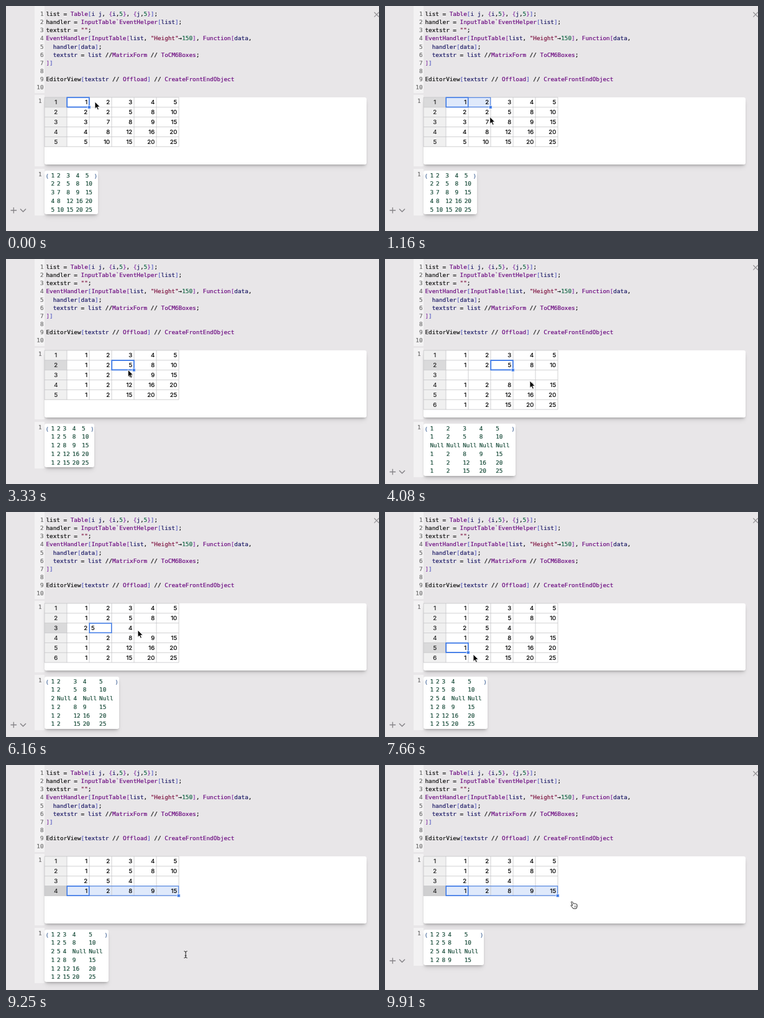
These frames come from a looping animation (600 by 362 pixels, 9990 ms). An HTML page:

```html
<!DOCTYPE html>
<html lang="en">
<head>
<meta charset="utf-8">
<title>Notebook table editing</title>
<style>
html, body { margin: 0; width: 100%; height: 100%; overflow: hidden; background: #e8e6e8; }
#stage { position: absolute; left: 0; top: 0; width: 600px; height: 362px; overflow: hidden; }
#stage div { position: absolute; }
.gutter { left: 46px; width: 16px; background: #f3f2f3; }
.card { left: 62px; background: #fff; border-radius: 3px; box-shadow: 0 6px 9px -2px rgba(0,0,0,.1), 0 3px 4px -2px rgba(0,0,0,.28); }
svg { position: absolute; left: 0; top: 0; }
text { white-space: pre; }
text, tspan { fill: currentColor; stroke: currentColor; stroke-width: .2px; }
.code { font: 9.32px "DejaVu Sans Mono", monospace; }
.cell { font: 9.6px Inter, sans-serif; }
</style>
</head>
<body>
<div id="stage">
  <div class="gutter" style="top:0;height:140px"></div>
  <div class="gutter" style="top:143px;height:115px"></div>
  <div class="gutter" id="outGutter" style="top:262px"></div>
  <div class="card" style="top:147px;width:518px;height:108px"></div>
  <div class="card" id="outCard" style="top:265px"></div>
  <svg width="600" height="362">
    <g id="code"></g>
    <g id="live"></g>
  </svg>
</div>
<script>
const LOOP = 9990, STEPS = 120;
const CHAR = 5.61;
const BLUE = '#3f7be8';
const $ = id => document.getElementById(id);

const esc = s => String(s).replace(/&/g, '&amp;').replace(/</g, '&lt;');
const text = (x, y, s, cls, color, anchor = 'start') =>
  `<text x="${x}" y="${y}" class="${cls}" color="${color}" text-anchor="${anchor}">${esc(s)}</text>`;
const rect = (x, y, w, h, fill, stroke = 'none', sw = 1) =>
  `<rect x="${x}" y="${y}" width="${w}" height="${h}" fill="${fill}" stroke="${stroke}" stroke-width="${sw}"/>`;
const path = (d, stroke, sw, fill = 'none') =>
  `<path d="${d}" stroke="${stroke}" stroke-width="${sw}" fill="${fill}" stroke-linejoin="round"/>`;

// ---- code cell
const LINES = [
  'list = Table[i j, {i,5}, {j,5}];',
  'handler = InputTable`EventHelper[list];',
  'textstr = "";',
  'EventHandler[InputTable[list, "Height"→150], Function[data,',
  '  handler[data];',
  '  textstr = list //MatrixForm // ToCM6Boxes;',
  ']]',
  '',
  'EditorView[textstr // Offload] // CreateFrontEndObject',
  ''
];
const BRACKETS = ['#5c62c4', '#8b3aa8', '#5c62c4'];

function drawCode() {
  let depth = 0;
  const color = tok => {
    if (/^"/.test(tok)) return '#7d1340';
    if (/^(?!EditorView)[A-Z]/.test(tok)) return '#6b0a80';
    if (/^\d/.test(tok)) return '#164';
    if (/[\[{]/.test(tok)) return BRACKETS[depth++ % 3];
    if (/[\]}]/.test(tok)) return BRACKETS[--depth % 3];
    return depth && /^[a-z]/.test(tok) ? '#1c1a66' : '#111';
  };
  const rows = LINES.map((line, i) => {
    const y = 16.1 + i * 13.13;
    const spans = (line.match(/"[^"]*"|[A-Z][\w`]*|[a-z]\w*|\d+|[\[\]{}]|[^\w"\[\]{}]+/g) || [])
      .map(tok => `<tspan color="${color(tok)}">${esc(tok)}</tspan>`).join('');
    return text(60.5, y, i + 1, 'code', '#6c6c6c', 'end') +
      `<text x="64.5" y="${y}" class="code">${spans}</text>`;
  });
  $('code').innerHTML = rows.join('') +
    text(52, 156.2, 1, 'code', '#6c6c6c') + text(52, 274.4, 1, 'code', '#6c6c6c');
}

// ---- what happens when
const copy = grid => grid.map(row => row.slice());
const sync = s => { s.out = copy(s.grid); };
const select = (r, c, r2 = r, c2 = c) => s => { s.sel = [r, c, r2, c2]; s.edit = null; };
const type = value => s => { s.edit = value; };
const commit = (r, c) => s => {
  s.grid[s.sel[0]][s.sel[1]] = s.edit;
  select(r, c)(s);
};
const hover = on => s => { s.hover = on; };
const syncRow = r => s => { s.out[r] = s.grid[r].slice(); };

const EVENTS = [
  [650, select(0, 0, 0, 1)],
  [1700, s => {
    s.grid.forEach(row => row.splice(0, 2, 1, 2));
    select(0, 0, 4, 1)(s);
  }],
  [1900, syncRow(1)], [2080, syncRow(2)],
  [2250, select(1, 3)],
  [2300, syncRow(3)], [2570, syncRow(4)],
  [2700, select(1, 2)],
  [3200, hover(false)],
  [3900, s => { s.grid.splice(2, 0, Array(5).fill('')); s.hover = true; }],
  [4070, sync],
  [4450, select(2, 0)], [4750, type(2)], [4980, commit(2, 1)], [5150, sync],
  [5350, select(2, 2)], [5550, type(4)], [5750, commit(2, 1)], [5900, sync],
  [6070, type(5)], [6500, commit(3, 1)], [6700, sync],
  [7300, select(4, 0)],
  [8000, select(4, 0, 5, 4)],
  [8150, hover(false)],
  [8900, s => { s.grid.splice(4, 2); select(3, 0, 3, 4)(s); }],
  [9550, hover(true)],
  [9700, sync]
];

function stateAt(t) {
  const grid = [
    [1, 2, 3, 4, 5], [2, 2, 5, 8, 10], [3, 7, 8, 9, 15], [4, 8, 12, 16, 20], [5, 10, 15, 20, 25]
  ];
  const s = { grid, out: copy(grid), sel: [0, 0, 0, 0], edit: null, hover: true };
  for (const [at, act] of EVENTS) if (at <= t) act(s);
  return s;
}

// ---- spreadsheet
const colX = c => 98 + c * 36;
const rowY = r => 147 + r * 15.85;

function drawTable({ grid, sel, edit }) {
  const [r1, c1, r2, c2] = sel;
  const bottom = rowY(grid.length);
  const base = r => rowY(r) + 11.3;
  let h = '';
  grid.forEach((row, r) => {
    const active = r >= r1 && r <= r2;
    h += rect(62, rowY(r), 36, 15.85, active ? (c2 - c1 === 4 ? '#cfcfd0' : '#dadadb') : '#f0f0f0');
  });
  if (r1 !== r2 || c1 !== c2) {
    h += rect(colX(c1), rowY(r1), colX(c2 + 1) - colX(c1), rowY(r2 + 1) - rowY(r1), '#dfe9fb');
  }
  let grille = '';
  for (let r = 0; r <= grid.length; r++) grille += `M62 ${rowY(r)}H278`;
  for (let c = -1; c <= 5; c++) grille += `M${colX(c)} 147V${bottom}`;
  h += path(grille, '#c6c6c8', 0.8);
  grid.forEach((row, r) => {
    h += text(80.3, base(r), r + 1, 'cell', '#222', 'middle');
    row.forEach((v, c) => { h += text(colX(c) + 33.2, base(r), v, 'cell', '#000', 'end'); });
  });
  const x = colX(c1) + 0.3, y = rowY(r1) + 0.3;
  if (edit !== null) {
    return h + rect(x, y, 35.4, 15.3, '#fff', BLUE, 1.5) + text(x + 2.6, base(r1), edit, 'cell', '#000');
  }
  const right = colX(c2 + 1), low = rowY(r2 + 1);
  h += rect(x, y, right - x - 0.3, low - y - 0.3, 'none', BLUE, r1 === r2 && c1 === c2 ? 1.5 : 1);
  h += rect(x, y, 35.4, 15.3, 'none', BLUE, 1.5);
  return h + rect(right - 2.8, low - 2.6, 5, 5, BLUE, '#fff', 0.8);
}

// ---- matrix output
function drawMatrix({ out, hover }) {
  const label = v => v === '' ? 'Null' : String(v);
  const bottom = 265.5 + out.length * 13.75;
  let x = 72.4, h = '';
  for (let c = 0; c < 5; c++) {
    const col = out.map(row => label(row[c]));
    col.forEach((v, r) => { h += text(x, 275.6 + r * 13.75, v, 'code', '#164a38'); });
    x += Math.max(...col.map(v => v.length)) * CHAR + 4;
  }
  const end = x - 4;
  h += text(63.5, 276.8, '(', 'code', '#47689a') + text(end + 2.6, 276.8, ')', 'code', '#47689a');
  const card = $('outCard').style;
  card.width = end + 9 - 62 + 'px';
  card.height = bottom - 264 + 'px';
  $('outGutter').style.height = bottom + 2.5 - 262 + 'px';
  if (hover) {
    const y = bottom - 5.5;
    h += path(`M7.5 ${y}h9.6M12.3 ${y - 4.8}v9.6`, '#858387', 1.3);
    h += path(`M23 ${y - 2.3}l4.5 4.6l4.5 -4.6`, '#858387', 1.4);
    h += path('M592.3 10l7.6 7.6M599.9 10l-7.6 7.6', '#949296', 1.2);
  }
  return h;
}

// ---- pointer: time, x, y
const MOVES = [
  [0, 143, 154], [250, 128, 155], [650, 160, 156], [900, 169, 162], [1650, 168, 219],
  [1850, 172, 217], [2200, 227, 172], [2500, 185, 177], [2700, 188, 172], [3150, 188, 174],
  [3800, 232, 197], [4080, 233, 196], [4450, 118, 186], [4980, 122, 189], [5350, 192, 186],
  [5750, 206, 189], [6160, 212, 190], [6700, 212, 191], [7300, 120, 219], [7660, 142, 229],
  [7850, 84, 218], [8000, 82, 233], [8200, 86, 235], [8850, 150, 304], [9170, 289, 305],
  [9330, 289, 305], [9600, 303, 230], [9910, 304, 225]
];

function pointerAt(t) {
  const i = MOVES.findIndex(m => m[0] > t);
  if (i < 0) return MOVES[MOVES.length - 1].slice(1);
  const [t0, x0, y0] = MOVES[i - 1], [t1, x1, y1] = MOVES[i];
  const u = (t - t0) / (t1 - t0), e = u * u * (3 - 2 * u);
  return [x0 + (x1 - x0) * e, y0 + (y1 - y0) * e];
}

const ARROW = path('M0 0V11.4L2.6 9L4.5 13.2L6.4 12.3L4.6 8.3H8.2Z', '#fff', 0.9, '#000');
const IBEAM = path('M-2.6 -5.4Q0 -5.4 0 -3.8Q0 -5.4 2.6 -5.4M0 -4V4M-2.6 5.4Q0 5.4 0 3.8Q0 5.4 2.6 5.4M-1.3 1.6H1.3', '#222', 1);
const HAND = path('M-4.6 -4.6Q-3.6 -6 -2.4 -4.6L-.6 -1.6Q.2 -2.8 1.4 -1.7Q2.4 -2.6 3.3 -1.3Q4.8 -1.7 5 .2L5 3L3.8 6H-1.2L-4.6 1.8Q-5.4 .4 -3.6 .3L-2.2 1.2Z', '#222', 1, '#fff') +
  path('M1 1.2V4M2.8 1.2V4', '#222', 0.6);

function drawPointer(t) {
  const [x, y] = pointerAt(t);
  const shape = t < 9000 ? ARROW : y > 258 ? IBEAM : HAND;
  return `<g transform="translate(${x} ${y})">${shape}</g>`;
}

// ---- clock
let shown = -1;
function tick() {
  const now = performance.now() % LOOP;
  const step = Math.min(STEPS - 1, Math.floor((now + 5) * STEPS / LOOP));
  if (step !== shown) {
    shown = step;
    const t = step * LOOP / STEPS, s = stateAt(t);
    $('live').innerHTML = drawTable(s) + drawMatrix(s) + drawPointer(t);
  }
  requestAnimationFrame(tick);
}

drawCode();
tick();
</script>
</body>
</html>
```
